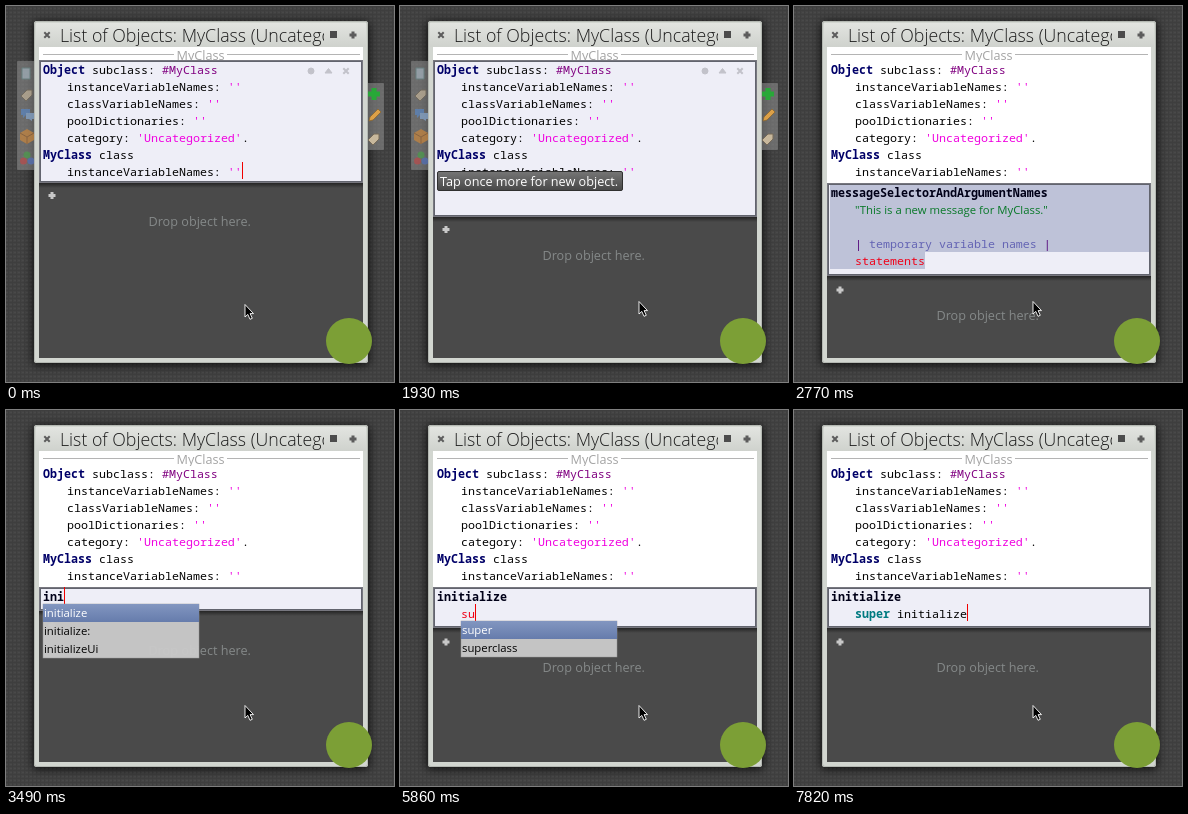
Write an HTML page that moves like this. It is 388x376 px and loops after 8000 ms.

```html
<!DOCTYPE html>
<html lang="en">
<head>
<meta charset="utf-8">
<title>Class editor</title>
<style>
  html, body { margin: 0; width: 100%; height: 100%; overflow: hidden; background: #424242; }
  svg { display: block; width: 388px; height: 376px; }
  text { white-space: pre; font-family: "Open Sans", "Noto Sans", sans-serif; font-size: 12.65px; }
  .title { font-size: 17.75px; font-weight: 300; fill: #1c1c1c; }
  .small { font-size: 11.33px; }
  .code { fill: #000; }
  .class { font-weight: bold; fill: #000068; }
  .head { font-weight: bold; fill: #000018; }
  .super { font-weight: bold; fill: #007a80; }
  .string { fill: #f000e0; }
  .symbol { fill: #800080; }
  .bar { fill: #500078; }
  .temp { fill: #6464b4; }
  .undef { fill: #f00018; }
  .note { fill: #087828; font: 11.33px "Open Sans", "Noto Sans", sans-serif; }
</style>
</head>
<body>
<svg viewBox="0 0 388 376">
  <defs>
    <pattern id="linen" width="4" height="4" patternUnits="userSpaceOnUse">
      <rect width="4" height="4" fill="#434343"/>
      <path d="M0 .5H4M2.5 0V4" stroke="#3e3e3e"/>
      <path d="M0 2.5H2" stroke="#494949"/>
    </pattern>
    <linearGradient id="bar" x2="0" y2="1">
      <stop offset="0" stop-color="#e2e4e0"/><stop offset="1" stop-color="#cfd2cd"/>
    </linearGradient>
    <linearGradient id="fall" x2="0" y2="1">
      <stop offset="0" stop-color="#000" stop-opacity=".5"/><stop offset="1" stop-color="#000" stop-opacity="0"/>
    </linearGradient>
    <linearGradient id="tip" x2="0" y2="1">
      <stop offset="0" stop-color="#767676"/><stop offset="1" stop-color="#484848"/>
    </linearGradient>
    <linearGradient id="pick" x2="0" y2="1">
      <stop offset="0" stop-color="#8296c0"/><stop offset="1" stop-color="#667cac"/>
    </linearGradient>
    <filter id="blur" x="-10%" y="-10%" width="120%" height="120%"><feGaussianBlur stdDeviation="5"/></filter>
    <clipPath id="titleClip"><rect x="50" y="18" width="268" height="24"/></clipPath>
    <path id="plus" d="M-3.5 0H3.5M0-3.5V3.5" fill="none" stroke-width="3"/>
    <path id="cross" d="M-2.7-2.7 2.7 2.7M2.7-2.7-2.7 2.7" fill="none" stroke-width="2"/>
    <path id="tag" d="M-6 1 0-5 5-5 5 0-1 6Z" fill="#c8b89c" stroke="#766a58"/>
  </defs>

  <rect width="388" height="376" fill="url(#linen)"/>
  <rect x="27" y="16" width="336" height="343" rx="3" opacity=".8" filter="url(#blur)"/>
  <g id="halo">
    <path d="M11.5 55.5H29V163.5H11.5ZM361 77.5H377.5V143.5H361Z" fill="#989898" fill-opacity=".5" stroke="#888" stroke-opacity=".4"/>
    <g opacity=".65">
      <path d="M16 62H24V73H16Z" fill="#a8b8c4" stroke="#688"/>
      <use href="#tag" x="21" y="89"/>
      <path d="M15 103H24V109H20L17 112V109H15Z" fill="#5888c8"/>
      <path d="M20 107H28V113H26V115L23 113H20Z" fill="#88acd8"/>
      <path d="M14 127 21 123 28 127V134L21 138 14 134Z" fill="#d08838"/>
      <path d="M14 127 21 131 28 127M21 131V138" fill="none" stroke="#98602c"/>
      <circle cx="21" cy="149" r="3.5" fill="#48a048"/>
      <circle cx="17.5" cy="155" r="3.5" fill="#c04848"/>
      <circle cx="25" cy="155" r="3.5" fill="#5070c0"/>
    </g>
    <use href="#plus" transform="translate(368 88) scale(1.7)" stroke="#28a838" stroke-width="3"/>
    <path d="M363 115 364 111 372 103 375 106 367 114Z" fill="#dca048" stroke="#8a6630" stroke-width=".8"/>
    <use href="#tag" x="368" y="133"/>
  </g>

  <rect x="28" y="15" width="334" height="342" rx="2.5" fill="#d2d6d0"/>
  <rect x="28.5" y="15.5" width="333" height="341" rx="2.5" fill="none" stroke="#b4b8b2"/>
  <rect x="30" y="17" width="330" height="24" fill="url(#bar)"/>
  <rect x="33" y="41" width="324" height="311" fill="#4a4a4a"/>
  <rect x="33" y="41" width="324" height="136" fill="#fff"/>
  <g stroke="#5c5c5c"><use href="#cross" x="41" y="29"/><use href="#plus" x="347" y="29"/></g>
  <rect x="324" y="25" width="7" height="7" fill="#4c4c4c"/>
  <g clip-path="url(#titleClip)"><text class="title" x="54" y="36">List of Objects: MyClass (Uncategorized)</text></g>
  <path d="M37 48.5H168M221 48.5H354" stroke="#b4b4b4"/>
  <text x="170.5" y="54" fill="#a4a4a4">MyClass</text>

  <g id="live"></g>
  <circle cx="343" cy="335" r="23" fill="#7c9f36"/>
  <path id="pointer" d="M.5.5V13L3.3 10.4 5.5 15.3 7.8 14.3 5.6 9.6H9Z" stroke="#fff" stroke-width=".9"/>
</svg>

<script>
const LOOP = 8000, ROW = 17, CLASS_TOP = 54, METHOD_TOP = 177;
const $ = id => document.getElementById(id);

// The code font is sized so that one character is 7 px wide.
const mono = '"Noto Sans Mono", "DejaVu Sans Mono", monospace';
const pen = document.createElement('canvas').getContext('2d');
pen.font = `100px ${mono}`;
const codeStyle = `font-family:${mono.replaceAll('"', "'")};font-size:${700 / pen.measureText('0').width}px`;

// A line of code: left edge, then pairs of class and text.
const line = (x, ...parts) => ({ x, parts });
const empty = name => line(61, '', name + ': ', 'string', "''");
const classCode = [
  line(37, 'class', 'Object', '', ' subclass: ', 'symbol', '#MyClass'),
  empty('instanceVariableNames'),
  empty('classVariableNames'),
  empty('poolDictionaries'),
  line(61, '', 'category: ', 'string', "'Uncategorized'", '', '.'),
  line(37, 'class', 'MyClass', '', ' class'),
  empty('instanceVariableNames')
];
const template = [
  line(37, 'head', 'messageSelectorAndArgumentNames'),
  line(61, 'note', '"This is a new message for MyClass."'),
  line(61),
  line(61, 'bar', '| ', 'temp', 'temporary variable names', 'bar', ' |'),
  line(61, 'undef', 'statements')
];
const head = text => line(37, 'head', text);
const body = (...parts) => [head('initialize'), line(61, ...parts)];
const send = text => body('super', 'super', '', ' ' + text);
const inits = ['initialize', 'initialize:', 'initializeUi'];
const menu = (x, y, items) => ({ x, y, items });
const sMenu = menu(61, 211, ['self', 'super']);
const suMenu = menu(61, 211, ['super', 'superclass']);

// Each row changes part of the state from its time on.
const steps = [
  [0, { rows: 7, caret: [236, 156], tip: 0, halo: 1, pointer: [238.5, 298], method: null, menu: null, hold: 0 }],
  [60, { pointer: [238.5, 296.5] }],
  [120, { pointer: [238.5, 295], caret: null }],
  [580, { rows: 8, caret: [37, 173] }],
  [1230, { rows: 9, caret: [37, 190] }],
  [1490, { tip: .25 }],
  [1550, { tip: .5 }],
  [1610, { tip: .75 }],
  [1670, { tip: 1 }],
  [1930, { caret: null }],
  [2530, { rows: 7, tip: 0, method: template, halo: .8 }],
  [2590, { halo: .6 }],
  [2650, { halo: .4 }],
  [2710, { halo: .2 }],
  [2770, { halo: 0 }],
  [3170, { method: [head('i')], caret: [44, 177], hold: 263 }],
  [3430, { method: [head('in')], caret: [51, 177], hold: 0 }],
  [3490, { method: [head('ini')], caret: [58, 177], menu: menu(37, 194, inits) }],
  [3950, { method: [head('initialize')], caret: [114, 177], menu: null }],
  [4480, { caret: [107, 177] }],
  [4880, { method: body(), caret: [37, 194] }],
  [5470, { caret: [61, 194] }],
  [5600, { method: body('undef', 's'), caret: [68, 194], menu: sMenu }],
  [5860, { method: body('undef', 'su'), caret: [75, 194], menu: suMenu }],
  [6120, { method: body('undef', 'sup'), caret: [82, 194] }],
  [6250, { method: body('undef', 'supe'), caret: [89, 194] }],
  [6580, { method: send(''), caret: [96, 194] }],
  [6840, { caret: [103, 194], menu: null }],
  [6900, { method: send('i'), caret: [110, 194] }],
  [6960, { method: send('in'), caret: [117, 194], menu: menu(102, 211, ['includes:', 'inspect', 'instVarNamed:put:']) }],
  [7160, { method: send('ini'), caret: [124, 194], menu: menu(102, 211, inits) }],
  [7560, { method: send('initialize'), caret: [180, 194], menu: null }],
  [7820, { caret: [173, 194] }]
];

const box = (x, y, w, h, more) => `<rect x="${x}" y="${y}" width="${w}" height="${h}" ${more}/>`;

function code(lines, top) {
  return lines.map(({ x, parts }, i) => {
    let spans = '';
    for (let k = 0; k < parts.length; k += 2) spans += `<tspan class="${parts[k]}">${parts[k + 1]}</tspan>`;
    return `<text class="code" style="${codeStyle}" x="${x}" y="${top + 14 + i * ROW}">${spans}</text>`;
  }).join('');
}

function pane(top, bottom, alpha) {
  return `<g opacity="${alpha}">` + box(33.5, top + .5, 323, bottom - top, 'fill="#eeeef7" stroke="#77777f"') +
    box(34.5, top + 1.5, 321, bottom - top - 2, 'fill="none" stroke="#62646e"') + '</g>';
}

function dropArea(end, withMethod) {
  const plusY = end + (withMethod ? 21 : 16.5), textY = end + (withMethod ? 51 : 47);
  return `<use href="#plus" x="46" y="${plusY}" stroke="#c8c8c8"/>` +
    `<text x="142.5" y="${textY}" fill="#858989">Drop object here.</text>`;
}

function popup({ x, y, items }) {
  return box(x, y, 156, items.length * 18, 'fill="#c9c9c9" fill-opacity=".97" stroke="#999" stroke-width=".5"') +
    box(x, y, 156, 18, 'fill="url(#pick)"') +
    items.map((item, i) => `<text class="small" x="${x + 1}" y="${y + 13 + i * 18}" fill="${i ? '#000' : '#fff'}">${item}</text>`).join('');
}

function draw(s) {
  const classEnd = CLASS_TOP + s.rows * ROW;
  let end = classEnd, edge = classEnd + 3, out = '';
  out += box(33, 56, 324, edge - 56, 'fill="#fff"') + pane(CLASS_TOP, edge, s.halo);
  out += `<g opacity="${s.halo}" fill="#c2c2ca" stroke="#c2c2ca"><circle cx="305" cy="65" r="3"/>` +
    '<path d="M319 67 322.5 62.5 326 67Z"/><use href="#cross" x="340" y="65"/></g>';
  out += code(classCode, CLASS_TOP);
  if (s.method) {
    end = METHOD_TOP + s.method.length * ROW + (s.method === template ? 1 : 0);
    edge = end + 6;
    out += pane(METHOD_TOP, edge, 1);
    if (s.method === template) out += '<path d="M36 179H355V246H131V263H36Z" fill="#bec2d8"/>';
    out += code(s.method, METHOD_TOP);
  }
  out += box(33, edge + 1, 324, 5, 'fill="url(#fall)"');
  out += dropArea(s.hold || end, s.method);
  if (s.caret) out += box(s.caret[0], s.caret[1], 1, ROW, 'fill="#f00000"');
  if (s.menu) out += popup(s.menu);
  out += `<g opacity="${s.tip}">` + box(37.5, 165.5, 185, 19, 'rx="1.5" fill="url(#tip)" stroke="#303030"') +
    '<text x="40" y="180" fill="#fff">Tap once more for new object.</text></g>';
  $('live').innerHTML = out;
  $('halo').setAttribute('opacity', s.halo);
  $('pointer').setAttribute('transform', `translate(${s.pointer})`);
}

let shown = 0;
function tick() {
  const t = performance.now() % LOOP;
  const past = steps.filter(([at]) => at <= t);
  if (past.length !== shown) {
    shown = past.length;
    draw(Object.assign({}, ...past.map(([, change]) => change)));
  }
  requestAnimationFrame(tick);
}
tick();
</script>
</body>
</html>
```
